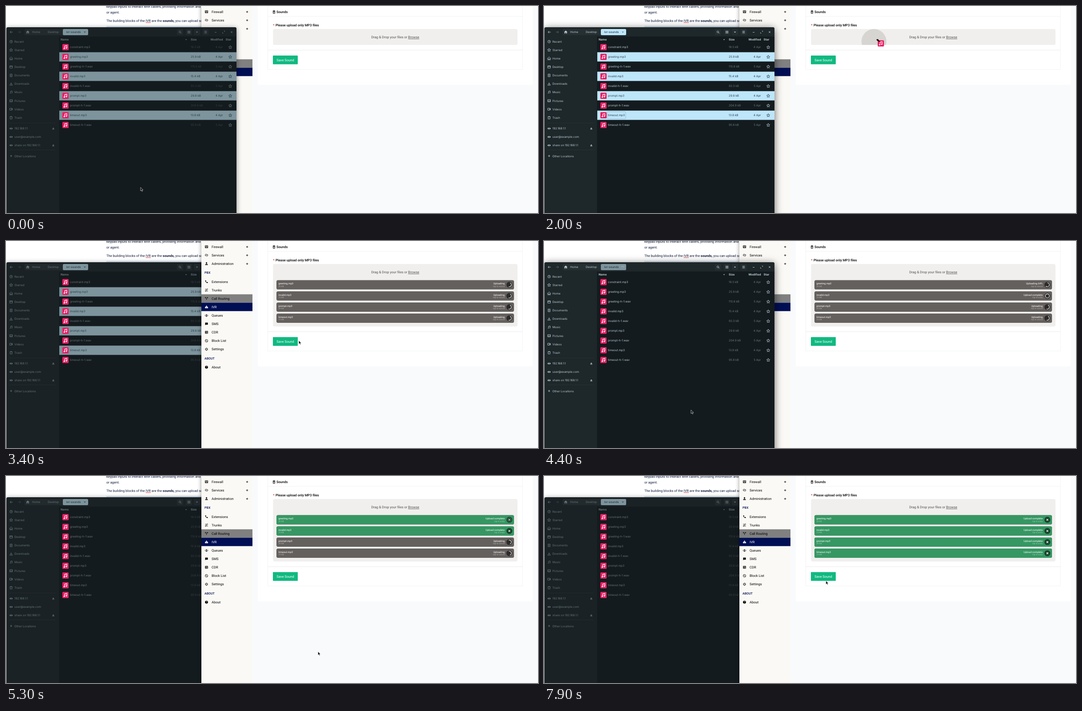
An HTML page that plays this animation: 1198 by 468 pixels, repeating every 8000 ms.

```html
<!DOCTYPE html>
<html lang="en">
<head>
<meta charset="utf-8">
<title>Uploading sounds</title>
<style>
html, body { margin: 0; width: 100%; height: 100%; overflow: hidden; background: #fff; }
svg { display: block; width: 100%; height: 100%; --grow: 0px; --lit: 0%; }
text { font: 7.57px Roboto, sans-serif; text-rendering: geometricPrecision; white-space: pre; }
.ln { fill: none; stroke: currentColor; stroke-width: .9; }
.fl { fill: currentColor; }
.end { text-anchor: end; }
.mid { text-anchor: middle; }
.medium { font-weight: 500; }
.doc { fill: #0b1839; }

#files {
  --fg: #bcd0d8; --sub: #6b7a80; --bar: #1e272a; --list: #141b1e;
  --sel: color-mix(in srgb, #bde6fb var(--lit), #7d949d);
  color: var(--fg);
}
#files.dim { --fg: #68757a; --sub: #353f43; --bar: #1a2225; --list: #141b1e; }
#files text { font: 6.4px Inter, sans-serif; fill: var(--fg); }
#files .sub { fill: var(--sub); }
#files .head { font-weight: 700; }
#files .tab { fill: #24343b; font-weight: 500; }
.frame { fill: var(--list); filter: drop-shadow(0 3px 9px rgba(0, 0, 0, .6)); }
.dim .frame { filter: drop-shadow(0 2px 6px rgba(0, 0, 0, .45)); }
.bar { fill: var(--bar); }
.button { fill: #fff; opacity: .035; }
.rule { stroke: #fff; stroke-opacity: .12; stroke-width: .7; stroke-dasharray: 1 1; }
.sel { fill: var(--sel); }
.row .sel, .ring { display: none; }
.picked .pick { --fg: #283b44; --sub: #283b44; color: var(--fg); }
.picked .pick .sel { display: inline; }
.picked:not(.dim) .ring { display: inline; fill: none; stroke: #48616c; stroke-width: .6; stroke-dasharray: 1 1; }

.back { filter: drop-shadow(0 0 5px rgba(0, 0, 0, .4)); }
.group { font-size: 7px; font-weight: 500; fill: #000e54; }
.page { fill: #fff; height: calc(188px + var(--grow)); }
.card { fill: none; stroke: #eceef1; stroke-width: .7; height: calc(153.5px + var(--grow)); }
.zone { fill: #f0efed; height: calc(36px + var(--grow)); }
#lower { transform: translateY(var(--grow)); }
.item text { font-size: 5.7px; fill: #fff; }
.item .note { font-size: 4.6px; opacity: .5; }
.arc { fill: none; stroke: #fff; stroke-width: 1.2; }
</style>
</head>
<body>
<script>
const LOOP = 8000, STEP = 100;

// Markup helpers
const text = (x, y, s, cls = '') => `<text x="${x}" y="${y}" class="${cls}">${s}</text>`;
const rect = (x, y, w, h, attrs = '') => `<rect x="${x}" y="${y}" width="${w}" height="${h}" ${attrs}/>`;
const icon = (x, y, d, cls = 'ln') => `<path transform="translate(${x} ${y})" class="${cls}" d="${d}"/>`;
const tune = (x, y) => `<use href="#tune" x="${x}" y="${y}"/>`;
const disc = r => `M${-r} 0a${r} ${r} 0 1 0 ${2 * r} 0a${r} ${r} 0 1 0 ${-2 * r} 0Z`;
const starPath = 'M' + Array.from({ length: 10 }, (_, i) => {
  const a = i * Math.PI / 5, r = i % 2 ? 1.7 : 3.8;
  return `${(r * Math.sin(a)).toFixed(2)} ${(-r * Math.cos(a)).toFixed(2)}`;
}).join('L') + 'Z';
const plus = 'M-2.3 0H2.3M0-2.3V2.3';
const triangle = 'M-2.2-1.1H2.2L0 1.4Z';
const house = 'M-3.8 0 0-3.6 3.8 0H2.7V3.2H.8V.8H-.8V3.2H-2.7V0Z';
const share = 'M-3.8 0-.7-2.6V2.6ZM3.8 0 .7-2.6V2.6Z';
const eject = 'M-2.2.6 0-2.2 2.2.6ZM-2.2 1.3H2.2V2.2H-2.2Z';

// File manager
const places = [
  ['Recent', disc(3) + 'M0-1.8V.2H1.5'],
  ['Starred', starPath],
  ['Home', house],
  ['Desktop', 'M-3-2.5H3V2.5H-3ZM-3-1.2H3'],
  ['Documents', 'M-2.3-3H2.3V3H-2.3ZM-1-1H1M-1 .8H1'],
  ['Downloads', 'M0-3V1.2M-2-.6 0 1.4 2-.6M-3 1.5V3H3V1.5'],
  ['Music', 'M-1.2 2V-2.4L2.4-3V1.4M-2.8 2.2H-1.2M.8 1.6H2.4'],
  ['Pictures', 'M-3-2.5H3V2.5H-3ZM-3 1.5-1 0 .6 1.2 2-.4 3 1'],
  ['Videos', 'M-3-2.2H1V2.2H-3ZM1-.6 3-1.8V1.8L1 .6'],
  ['Trash', 'M-2.2-1.8V3H2.2V-1.8M-3-2H3M-1-3H1']
];
const sounds = [
  ['constraint.mp3', '18.5', 4], ['greeting.mp3', '25.9', 4, true], ['greeting-h-1.wav', '115.8', 5],
  ['invalid.mp3', '15.4', 4, true], ['invalid-h-1.wav', '93.3', 5], ['prompt.mp3', '29.8', 4, true],
  ['prompt-h-1.wav', '204.9', 5], ['timeout.mp3', '13.8', 4, true], ['timeout-h-1.wav', '95.8', 5]
];

const placeRow = ([name, d], i) => {
  const y = 80.5 + 19.1 * i;
  return icon(11.5, y, d) + text(19, y + 2.3, name);
};
const soundRow = ([name, size, day, pick], i) => {
  const y = 93 + 22 * i;
  return `<g class="row ${pick ? 'pick' : ''}">` + rect(120, y - 10.5, 399, 21, 'class="sel"') +
    tune(127, y - 7) + text(144, y + 2.3, name) + text(416, y + 2.3, size + ' kB', 'sub') +
    text(488.5, y + 2.3, day + ' Apr', 'sub end') + icon(505, y + .3, starPath, 'ln') + '</g>';
};
const filesMarkup = rect(1, 48, 518, 450, 'rx="4" class="frame"') +
  '<path class="bar" d="M1 69V52Q1 48 5 48H515Q519 48 519 52V69H119.5V468H1Z"/>' +
  rect(42, 52, 143, 14, 'rx="2" class="button"') +
  [385, 405, 423, 442.5].map(x => rect(x, 52, 14, 14, 'rx="2" class="button"')).join('') +
  icon(12, 59, 'M3.2 0H-3M-.4-2.6-3 0-.4 2.6') +
  `<g opacity=".4">${icon(30, 59, 'M-3.2 0H3M.4-2.6 3 0 .4 2.6')}</g>` +
  icon(49, 59, house, 'fl') + text(59, 61.3, 'Home') + text(94, 61.3, 'Desktop') +
  rect(128, 52, 57, 14, 'rx="2.5" class="sel"') + text(135.5, 61.3, 'ivr-sounds', 'tab') +
  icon(177.5, 59, triangle + '" style="fill:#24343b') +
  icon(391.5, 58.5, disc(2) + 'M1.5 1.5 3.5 3.5') +
  icon(412, 59, 'M-2.8-2.8H-.5V-.5H-2.8ZM.5-2.8H2.8V-.5H.5ZM-2.8.5H-.5V2.8H-2.8ZM.5.5H2.8V2.8H.5Z', 'fl') +
  icon(430, 59, triangle, 'fl') + icon(449.5, 59, 'M-2.7-2.1H2.7M-2.7 0H2.7M-2.7 2.1H2.7') +
  icon(472, 59.5, 'M-2 0H2') + icon(490, 59, 'M.7-2.5H2.5V-.7M-.7 2.5H-2.5V.7') +
  icon(508, 59, 'M-1.9-1.9 1.9 1.9M1.9-1.9-1.9 1.9') +
  text(123, 78, 'Name', 'head') + icon(405.5, 76, 'M-1.8-.8H1.8L0 1.2Z', 'fl') +
  text(416, 78, 'Size', 'head') + text(488.5, 78, 'Modified', 'head end') + text(494.5, 78, 'Star', 'head') +
  places.map(placeRow).join('') +
  '<path class="rule" d="M8 264.5H112M8 325.5H112"/>' +
  ['192.168.1.1', 'user@example.com', 'share on 192.168.1.1'].map((name, i) => {
    const y = 277 + 19 * i;
    return icon(11.5, y, share, 'fl') + text(19, y + 2.3, name) + (i === 1 ? '' : icon(106.5, y, eject, 'fl'));
  }).join('') +
  icon(11.5, 339, plus) + text(19, 341.5, 'Other Locations') +
  sounds.map(soundRow).join('') + rect(142.5, 239, 41.5, 16, 'rx="2" class="ring"');

// Browser
const menu = [
  ['Firewall', 13, 'M-3-2.6H3V2.6H-3ZM-3 0H3M0-2.6V0M-1.4 0V2.6M1.4 0V2.6'],
  ['Services', 32, 'M0-2.6-2.4-1.6Q-4 .4-1.8 2L1.6-2Q4-.4 2.4 1.6L0 2.6'],
  ['Administration', 51.3, 'M-1.6-1.6a1.6 1.6 0 1 0 3.2 0a1.6 1.6 0 1 0-3.2 0ZM-3.2 3Q-3 .6 0 .6T3.2 3Z', 'fl'],
  ['Extensions', 92, 'M-3-3H-1.2L-.6-1-1.6 0Q-1 1 0 1.6L1 .6 3 1.2V3Q-2.6 3-3-3Z', 'fl'],
  ['Trunks', 111, 'M-3.2-2H3M1.6-3.2 3-2M-3 2H3.2M-1.6 .8-3 2-1.6 3.2M-1.2 0H1.2'],
  ['Call Routing', 130, 'M0 3.2V.4L-2.4-2.4M0 .4 2.4-2.4M-2.8-.6V-2.6H-.9M2.8-.6V-2.6H.9'],
  ['IVR', 149.2, 'M-.5-3.4H.5V-1.8Q2.4-1.8 2.6 0H3.4V2.8H-3.4V0H-2.6Q-2.4-1.8-.5-1.8ZM-1.8 .2V1.4H-.6V.2ZM.6 .2V1.4H1.8V.2Z', 'fl'],
  ['Queues', 168.4, 'M-1.3-1.4a1.3 1.3 0 1 0 2.6 0a1.3 1.3 0 1 0-2.6 0ZM-2 2.4Q-1.8.4 0 .4T2 2.4ZM-3.6 1.8-2.4-.4-3.4-1.8ZM3.6 1.8 2.4-.4 3.4-1.8Z', 'fl'],
  ['SMS', 187.4, 'M-3-3H3V1.8H-1.6L-3 3.2Z', 'fl'],
  ['CDR', 206.4, 'M-2.8-2.6H2.8V2.6H-2.8ZM-2.8-1.2H2.8M-2.8 .7H2.8M-.6-1.2V2.6'],
  ['Block List', 225.6, disc(3) + 'M-2.1-2.1 2.1 2.1'],
  ['Settings', 244.7, disc(2) + 'M0-3.4V-2M0 2V3.4M-3.4 0H-2M2 0H3.4M-2.4-2.4-1.4-1.4M1.4 1.4 2.4 2.4M2.4-2.4 1.4-1.4M-1.4 1.4-2.4 2.4'],
  ['About', 285.2, disc(3.3), 'fl']
];
const menuRow = ([name, y, d, cls], i) => `<g color="${name === 'IVR' ? '#fff' : '#000'}">` +
  icon(451.5, y, d, cls) + text(463, y + 2.7, name, 'fl') + (i < 3 ? icon(543, y + .3, plus) : '') + '</g>';

const uploads = [
  { name: 'greeting.mp3', kb: 25, from: 4080, done: 4580, over: 0 },
  { name: 'invalid.mp3', kb: 15, from: 3850, done: 4350, over: .0075 },
  { name: 'prompt.mp3', kb: 29, from: 5650, done: 6150, over: .015 },
  { name: 'timeout.mp3', kb: 13, from: 6020, done: 6520, over: .0175 }
];
const itemMarkup = ({ name, kb }) => '<g class="item">' +
  rect(-267.5, -10.5, 535, 21, 'rx="3.6" fill="#64605e"') +
  rect(-267.5, -10.5, 535, 21, 'rx="3.6" fill="#369763" class="green"') +
  text(-263, -.7, name) + text(-263, 4.8, kb + ' KB', 'note') +
  text(246.5, -.7, 'Uploading', 'end status') + text(246.5, 4.8, 'tap to cancel', 'end note hint') +
  '<circle cx="257" r="6.7" opacity=".55"/>' +
  '<g transform="translate(257)"><circle r="4.5" pathLength="100" class="arc"/>' +
  '<path class="arc cross" d="M-1.9-1.9 1.9 1.9M1.9-1.9-1.9 1.9"/></g></g>';

const browserMarkup = rect(440, -20, 800, 520, 'fill="#f9fafc" class="back"') +
  rect(440, -1, 115, 470, 'fill="#fbf9f5"') +
  rect(440, 120.5, 115, 19, 'fill="#808080"') + rect(440, 139.5, 115, 19, 'fill="#000e54"') +
  menu.map(menuRow).join('') + text(451.5, 287.3, '?', 'mid medium" style="font-size:5.5px;fill:#fff') +
  text(447, 74, 'PBX', 'group') + text(447, 267.5, 'ABOUT', 'group') +
  '<rect x="567" y="-10" width="619" class="page"/><rect x="589.5" y="-10" width="573.5" class="card"/>' +
  '<path d="M589.5 23.5H1163" stroke="#eceef1" stroke-width=".7"/>' +
  icon(603.5, 13.7, 'M-2-3H2V3H-2ZM-1-3V-1H1V-3M-.8 1.2H.8') + text(609, 16.3, 'Sounds', 'medium') +
  text(601.2, 45.8, '<tspan fill="#dc2626">*</tspan>', 'medium') + text(607, 45.5, 'Please upload only MP3 files', 'medium') +
  '<rect x="601.3" y="52" width="550.5" rx="3.8" class="zone"/>' +
  '<clipPath id="strip"><rect x="601.3" y="52" width="550.5" height="36" rx="3.8"/></clipPath>' +
  '<g clip-path="url(#strip)"><circle id="blob" cx="743" cy="80" fill="#292625"/></g>' +
  text(876.5, 73.2, 'Drag &amp; Drop your files or <tspan text-decoration="underline">Browse</tspan>', 'mid" fill="#4f4f4f') +
  '<g id="lower"><path d="M589.5 99.7H1163" stroke="#e4e6ea" stroke-width=".8"/>' +
  rect(601, 112, 56, 19.7, 'rx="1" fill="#10b981"') + text(629, 124.6, 'Save Sound', 'mid" fill="#fff') + '</g>' +
  uploads.map(itemMarkup).join('');

const docMarkup = rect(226, 45, 214, 10, 'fill="#dce8f4"') +
  text(226, 4.2, 'keypad inputs to interact with callers, providing information and', 'doc') +
  text(226, 16.8, 'or agent.', 'doc') +
  text(226, 35.9, 'The building blocks of the IVR are the <tspan font-weight="700">sounds,</tspan> you can upload sounds', 'doc') +
  '<path d="M314.5 37.6H326" stroke="#e03030" stroke-width=".9"/>';

document.body.innerHTML = `<svg viewBox="0 0 1198 468">
  <defs><g id="tune"><rect width="14" height="14" rx="1.6" fill="#ea1e63"/>
    <path d="M5.3 10V4.3L10 3.3V9" fill="none" stroke="#fff" stroke-width="1.2"/>
    <circle cx="4.2" cy="10" r="1.4" fill="#fff"/><circle cx="8.9" cy="9" r="1.4" fill="#fff"/></g></defs>
  <g>${docMarkup}</g><g id="browser">${browserMarkup}</g><g id="files">${filesMarkup}</g>
  <g id="pointer">
    <path id="arrow" d="M0 0V8L1.9 6.3 3.2 9.2 4.6 8.6 3.3 5.8H5.8Z" fill="#111" stroke="#fff" stroke-width=".6"/>
    <g id="drag">${tune(1.5, 1.5)}<path d="M-1.6.4Q0-2.4 3-.4L4 2 2.6 4 .4 2.2Z"/>
      <path d="M3 3.6H6.6M4.8 1.8V5.4" stroke="#000"/></g>
  </g></svg>`;

// Motion
const $ = sel => document.querySelector(sel);
const svg = $('svg'), files = $('#files'), browser = $('#browser'), pointer = $('#pointer'), blob = $('#blob');
const items = [...document.querySelectorAll('.item')];
const ramp = (t, a, b) => Math.min(1, Math.max(0, (t - a) / (b - a)));
const ease = (t, a, b) => { const k = ramp(t, a, b); return k * k * (3 - 2 * k); };

const track = [
  [0, 303, 410], [100, 303, 410], [900, 164, 247], [1000, 164, 247], [1700, 750, 76], [2100, 750, 76],
  [2400, 737, 130], [2600, 737, 130], [2700, 722, 190], [3100, 720, 196], [4300, 331, 382],
  [4400, 331, 382], [5000, 702.5, 397], [5300, 702.5, 397], [6200, 653, 306.5], [7100, 653, 306.5],
  [7900, 634.8, 237]
];
function pointerAt(t) {
  const next = track.findIndex(p => p[0] > t);
  if (next < 0) return track.at(-1).slice(1);
  const [a, b] = [track[next - 1], track[next]], k = ease(t, a[0], b[0]);
  return [a[1] + (b[1] - a[1]) * k, a[2] + (b[2] - a[2]) * k];
}

function drawItem(node, { from, done, over }, i, t) {
  const find = sel => node.querySelector(sel);
  const bounce = 1 - ease(t, 2700, 3000);
  const scale = t < 2700 ? .95 + .05 * ramp(t, 2200, 2400) : 1 + over * bounce;
  const lift = t >= 2700 && i ? -.8 * bounce : 0;
  node.setAttribute('transform', `translate(876.5 ${99 + 25.2 * i + lift}) scale(${scale})`);
  node.style.opacity = ramp(t, 2200, 2400);

  const part = ramp(t, from, done), complete = part === 1, cross = ramp(t, done + 500, done + 780);
  find('.status').textContent = complete ? 'Upload complete' : part ? `Uploading ${Math.round(part * 100)}%` : 'Uploading';
  find('.hint').textContent = complete ? 'tap to undo' : 'tap to cancel';
  find('.green').style.opacity = ramp(t, done + 100, done + 400);
  const arc = find('circle.arc');
  arc.setAttribute('stroke-dasharray', complete ? 'none' : `${part ? part * 100 : 50} 100`);
  arc.setAttribute('transform', `rotate(${part ? -90 : t * .36 - 214})`);
  arc.style.opacity = 1 - cross;
  find('.cross').style.opacity = cross;
}

let last = -1;
function draw(now) {
  requestAnimationFrame(draw);
  const t = Math.floor(now % LOOP / STEP) * STEP;
  if (t === last) return;
  last = t;

  const focused = t >= 900 && t < 3000 || t >= 4300 && t < 5000;
  const raised = t >= 3000 && t < 4300 || t >= 5000;
  const lit = ramp(t, 1000, 1300) - ramp(t, 3000, 3200) + ramp(t, 4400, 4700) - ramp(t, 5000, 5200);
  const top = raised ? browser : files;
  if (pointer.previousElementSibling !== top) svg.insertBefore(top, pointer);
  files.classList.toggle('dim', !focused);
  files.classList.toggle('picked', t < 4400);
  svg.style.setProperty('--lit', lit * 100 + '%');
  svg.style.setProperty('--grow', 105.3 * ease(t, 2200, 2400) + 'px');

  const burst = ramp(t, 2100, 2300);
  blob.setAttribute('r', 28 * ease(t, 1750, 2000) + 30 * burst);
  blob.setAttribute('opacity', .13 * ramp(t, 1800, 2000) * (1 - burst));

  const dragging = t >= 1100 && t < 2200;
  $('#drag').style.display = dragging ? '' : 'none';
  $('#arrow').style.display = dragging ? 'none' : '';
  pointer.setAttribute('transform', `translate(${pointerAt(t)})`);
  uploads.forEach((upload, i) => drawItem(items[i], upload, i, t));
}
draw(0);
</script>
</body>
</html>
```
